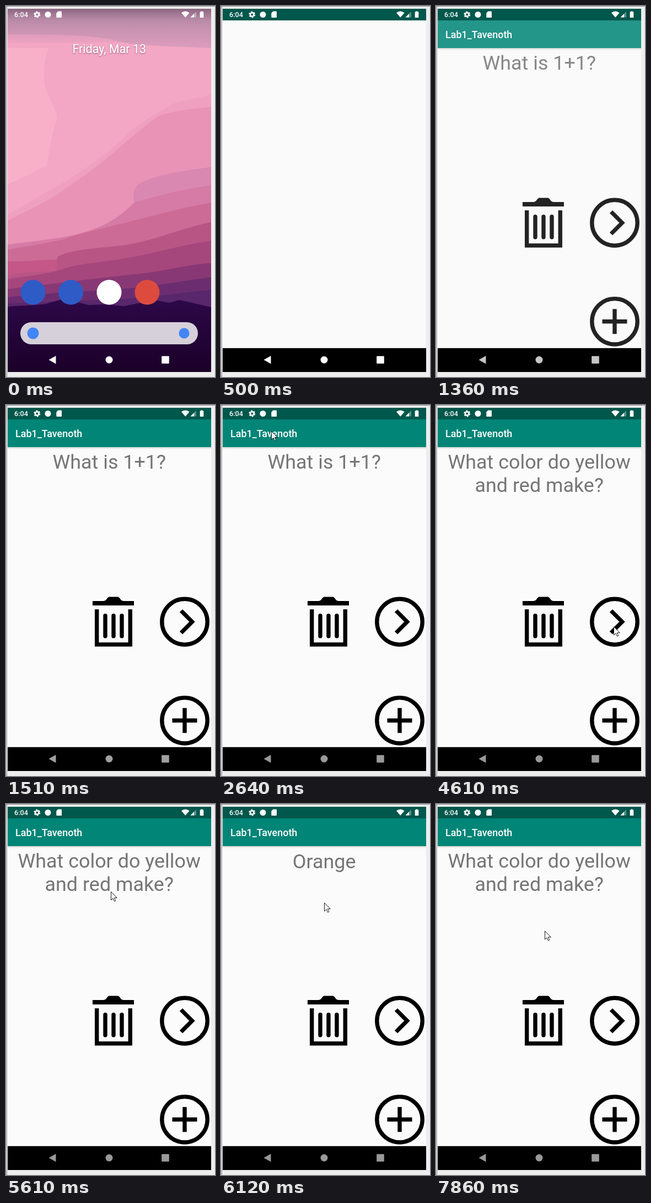
Animation of 379x670 px, one loop 8000 ms. Source, as an HTML page:

```html
<!DOCTYPE html>
<html lang="en">
<head>
<meta charset="utf-8">
<title>Flashcard demo</title>
<style>
  html, body { margin: 0; width: 100%; height: 100%; overflow: hidden; background: #ededed; }
  svg { display: block; width: 379px; height: 670px; font-family: Roboto, "Noto Sans", sans-serif; }
</style>
</head>
<body>
<svg viewBox="0 0 379 670" xmlns="http://www.w3.org/2000/svg">
  <defs>
    <clipPath id="screen"><path d="M3 5H372V661H3Z"/></clipPath>
    <linearGradient id="scrim" x2="0" y2="1">
      <stop offset="0" stop-color="#7d5b75" stop-opacity=".85"/>
      <stop offset=".35" stop-color="#a5809c" stop-opacity=".6"/>
      <stop offset="1" stop-color="#c890b0" stop-opacity=".2"/>
    </linearGradient>
    <linearGradient id="hills" x2="0" y2="1">
      <stop offset="0" stop-color="#2d0848"/>
      <stop offset="1" stop-color="#1b0029"/>
    </linearGradient>
    <linearGradient id="shade" x2="0" y2="1">
      <stop offset="0" stop-color="#000" stop-opacity=".16"/>
      <stop offset="1" stop-color="#000" stop-opacity="0"/>
    </linearGradient>
    <filter id="glow" x="-10%" y="-40%" width="120%" height="190%">
      <feDropShadow dx="0" dy="1" stdDeviation="1.2" flood-color="#402038" flood-opacity=".65"/>
    </filter>
  </defs>

  <path d="M0 .5H379M1.5 0V670" stroke="#8c8c8c" fill="none"/>
  <path d="M2.5 5V661" stroke="#fff"/>

  <g clip-path="url(#screen)">
    <g id="home">
      <path fill="#f4a6c5" d="M3 5H372V661H3Z"/>
      <path fill="#f8b0c9" d="M3 76H78C66 102 68 132 72 150C84 178 94 192 92 205C84 228 78 262 74 288C48 302 26 312 3 322Z"/>
      <path fill="#d99bbb" d="M3 5H372V76C300 72 230 74 190 60C130 50 60 52 3 51Z"/>
      <path fill="#efa0c0" d="M372 160C350 168 322 168 300 178C270 196 232 216 212 240C172 276 120 312 76 334C50 350 24 366 3 376V440H372Z"/>
      <path fill="#e993b6" d="M372 182C340 186 302 188 274 200C240 226 222 242 205 256C168 290 130 314 96 338C66 358 32 372 3 388V450H372Z"/>
      <path fill="#d988b2" d="M372 291C324 297 275 304 245 319C230 328 230 338 232 354L225 370L372 350Z"/>
      <path fill="#d67ba5" d="M372 324C315 331 262 346 231 356C202 386 174 400 130 412C88 422 44 425 3 431V480H372Z"/>
      <path fill="#cc6b96" d="M372 355C310 366 248 384 205 394C166 404 134 410 105 421C66 430 34 434 3 440V490H372Z"/>
      <path fill="#b85585" d="M372 390C318 402 278 420 226 430C180 438 130 436 94 452L88 470L3 478V515H372Z"/>
      <path fill="#c45788" d="M3 461C36 462 68 458 93 458L92 478C64 482 34 478 3 486Z"/>
      <path fill="#a5477d" d="M372 424C322 430 258 450 214 456C168 464 130 464 98 477C64 486 34 488 3 493V530H372Z"/>
      <path fill="#883874" d="M372 464C326 467 274 482 228 485C162 492 84 502 3 511V545H372Z"/>
      <path fill="#6c2d70" d="M372 490C320 496 272 506 222 510C140 516 70 518 3 526V550H372Z"/>
      <path fill="#59276b" d="M372 513C320 516 250 530 180 530L3 537V550H372Z"/>
      <path fill="url(#hills)" d="M3 543C24 541 52 541 72 538L100 530L122 533L150 540L180 539L215 542L244 536L270 531L296 536L314 531L338 536L372 544V661H3Z"/>
      <path fill="url(#scrim)" d="M3 5H372V66H3Z"/>
      <text x="187.3" y="85" font-size="21.5" fill="#fff" text-anchor="middle" filter="url(#glow)">Friday, Mar 13</text>
      <circle cx="49" cy="517" r="22.5" fill="#2f5bc7"/>
      <circle cx="117.5" cy="517" r="22.5" fill="#2f5bc7"/>
      <circle cx="187" cy="517" r="22.5" fill="#fff"/>
      <circle cx="256" cy="517" r="22.5" fill="#dc4b3e"/>
      <rect x="26" y="571" width="322" height="40" rx="20" fill="#d5d0d9"/>
      <circle cx="49" cy="591" r="10.5" fill="#4285f4"/>
      <circle cx="323" cy="591" r="9.5" fill="#4285f4"/>
    </g>

    <g id="app">
      <path fill="#fafafa" d="M3 26H372V618H3Z"/>
      <g id="content">
        <path fill="#fafbfa" d="M3 76H372V618H3Z"/>
        <path fill="url(#shade)" d="M3 76H372V80H3Z"/>
        <path fill="#008577" d="M3 26H372V76H3Z"/>
        <text x="17" y="58" font-size="17.96" font-weight="500" fill="#fff">Lab1_Tavenoth</text>
        <g font-size="35.9" fill="#757575" text-anchor="middle">
          <text id="line1" x="187.2"></text>
          <text id="line2" x="187.2"></text>
        </g>
        <path d="M157 354H176C183 354 183 347 187 346.5H203C207 347 207 354 214 354H232V362H157Z"/>
        <path d="M164.7 369V432.5H225.3V369" fill="none" stroke="#000" stroke-width="7.4"/>
        <path d="M180 380.5V417.5M195 380.5V417.5M210 380.5V417.5" stroke="#000" stroke-width="7.4" stroke-linecap="round"/>
        <g fill="none" stroke="#000" stroke-width="7.4">
          <circle cx="324" cy="391.5" r="41.2"/>
          <path d="M317.5 371.5L337.5 391.5L317.5 411.5"/>
          <circle cx="324" cy="569.8" r="41.2"/>
          <path d="M301.5 569.8H346.5M324 547.3V592.3"/>
        </g>
      </g>
      <path fill="#00574b" d="M3 5H372V26H3Z"/>
      <path fill="#000" d="M3 618H372V661H3Z"/>
      <path d="M3 617.5H372" stroke="#d2d2d2"/>
    </g>

    <g fill="#fff">
      <text x="15" y="20.3" font-size="12.7" font-weight="500">6:04</text>
      <circle cx="56.3" cy="15.5" r="3.2" fill="none" stroke="#fff" stroke-width="2.6"/>
      <circle cx="56.3" cy="15.5" r="5" fill="none" stroke="#fff" stroke-width="2" stroke-dasharray="2.9 2.336"/>
      <circle cx="76" cy="15.5" r="5.5"/>
      <path d="M94.5 9.5H100Q101 9.5 101 10.5V20Q101 21 100 21H92.3Q91.3 21 91.3 20V12.7Z"/>
      <path d="M318 12.3Q325.3 6.8 332.6 12.3L325.3 20.8Z"/>
      <path d="M345 10V20.5H334.5Z" opacity=".35"/>
      <path d="M341 14V20.5H334.5Z"/>
      <path d="M353.5 9.5H356.5V10.5H358.3V21H351.7V10.5H353.5Z"/>
    </g>
    <g id="nav">
      <path d="M77.5 639L90.5 631.8V646.2Z"/>
      <circle cx="187" cy="639" r="6.5"/>
      <rect x="282.2" y="632.2" width="13.6" height="13.6" rx="1"/>
    </g>
    <path id="cursor" fill="#fff" stroke="#000" stroke-width=".9" d="M.5 .5V15.6L4 12.3L6.5 17.7L8.8 16.7L6.4 11.4H11.3Z"/>
  </g>
</svg>
<script>
const LOOP = 8000;
const $ = id => document.getElementById(id);
const home = $("home"), app = $("app"), content = $("content"), nav = $("nav"), cursor = $("cursor");
const lines = [$("line1"), $("line2")];

const sum = { base: 114.6, text: ["What is 1+1?", ""] };
const color = { base: 114.6, text: ["What color do yellow", "and red make?"] };
const answer = word => ({ base: 116.3, text: [word, ""] });

// Each track lists [start time, value]; a value holds until the next one.
const cards = [[0, sum], [3320, answer("2")], [3760, sum], [4610, color], [6000, answer("Orange")], [6990, color]];
const fades = [[0, 0], [1230, .45], [1360, .86], [1510, 1]];
const navShades = [[0, 255], [930, 245], [1080, 232], [1230, 215], [1360, 198], [1510, 160], [1650, 153]];
const pointer = [
  [0, null], [2640, [91, 47]], [2760, [124, 90]], [2880, [149, 121]],
  [4060, [222, 205]], [4180, [295, 292]], [4330, [313, 344]], [4480, [322, 400]],
  [5070, [252, 225]], [5200, [191, 86]], [5340, [191, 118]], [5460, [190, 142]],
  [5610, [190, 158]], [5740, [190, 172]], [5860, [190, 178]], [6120, [187, 178]], [7860, [197, 229]]
];

const at = (track, t) => track.findLast(([start]) => start <= t)[1];
const show = (node, on) => node.setAttribute("visibility", on ? "visible" : "hidden");

function draw(t) {
  const launched = t >= 500;
  show(home, !launched);
  show(app, launched);
  content.setAttribute("opacity", at(fades, t));

  const card = at(cards, t);
  lines.forEach((line, i) => {
    if (line.textContent !== card.text[i]) line.textContent = card.text[i];
    line.setAttribute("y", card.base + i * 42);
  });

  const shade = at(navShades, t);
  nav.setAttribute("fill", `rgb(${shade},${shade},${shade})`);

  const tip = at(pointer, t);
  show(cursor, tip);
  if (tip) cursor.setAttribute("transform", `translate(${tip})`);
}

const began = performance.now();
function tick() {
  draw((performance.now() - began) % LOOP);
  requestAnimationFrame(tick);
}
tick();
</script>
</body>
</html>
```
